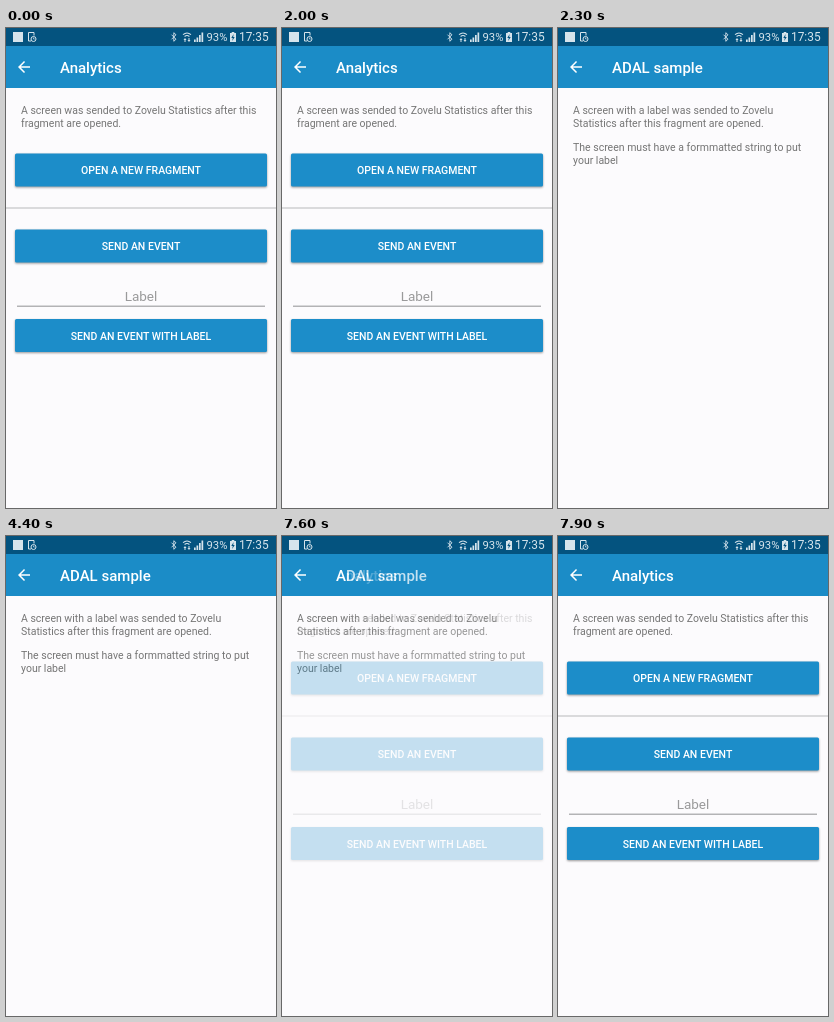
Recreate the animation shown at these times as an HTML page. Size 270x480 px, loop 8000 ms.

```html
<!DOCTYPE html>
<html lang="en">
<head>
<meta charset="utf-8">
<title>Analytics</title>
<style>
  html, body { margin: 0; width: 100%; height: 100%; overflow: hidden; background: #fcfbfd; }
  svg { display: block; width: 100vw; height: 100vh; font-family: Roboto, sans-serif; }
  .title { font-size: 15px; font-weight: 500; fill: #fff; }
  .body { font-size: 10.5px; fill: #757575; }
  .caption { font-size: 10.5px; font-weight: 500; fill: #fff; text-anchor: middle; }
  .hint { font-size: 13.5px; fill: #9a9a9b; text-anchor: middle; }
  .status { fill: #d6e4ec; }
</style>
</head>
<body>
<svg viewBox="0 0 270 480">
  <defs>
    <filter id="soft" x="-10%" y="-40%" width="120%" height="180%"><feGaussianBlur stdDeviation=".8"/></filter>
    <filter id="lift" x="-10%" y="-60%" width="120%" height="220%"><feGaussianBlur stdDeviation="2"/></filter>
    <clipPath id="face"><rect x="9" y="125.5" width="252" height="33" rx="1.5"/></clipPath>
  </defs>

  <g id="home"></g>
  <g id="detail"></g>

  <g class="status">
    <rect width="270" height="18" fill="#04537f"/>
    <rect x="7" y="4" width="10" height="10"/>
    <path d="M22.500 4.500h5.500v3M22.500 4.500v8.500h2.500" fill="none" stroke="#d6e4ec"/>
    <circle cx="27.500" cy="11" r="2.500" fill="none" stroke="#d6e4ec"/>
    <path d="M27.500 9.500v1.500h1.200" fill="none" stroke="#d6e4ec" stroke-width=".7"/>
    <path d="M165.500 6.700l4.500 4.500-2.200 2.100V4.700l2.200 2.100-4.500 4.500" fill="none" stroke="#d6e4ec" stroke-width=".9"/>
    <path d="M177 6.600q4-3.300 8 0M178.600 8.500q2.400-1.900 4.800 0" fill="none" stroke="#d6e4ec" stroke-width="1.100"/>
    <path d="M179 10l-1.500 2h1v2h1v-2h1zM183 14l1.500-2h-1v-2h-1v2h-1z"/>
    <path d="M188 11.500h1.700V14H188zM190.500 9.500h1.700V14h-1.700zM193 7h1.700v7H193zM195.500 4.500h1.700V14h-1.700z"/>
    <text x="200.500" y="13.300" font-size="11.300">93%</text>
    <path d="M225.700 4h2.600v1h1.700v9h-6V5h1.700z"/>
    <path d="M227.600 6l-2.300 4h1.500l-.6 3 2.500-4h-1.500z" fill="#04537f"/>
    <text x="233" y="13.300" font-size="11.900">17:35</text>
  </g>
</svg>
<script>
const LOOP = 8000, STEP = 100;
const $ = id => document.getElementById(id);

// Tracks are lists of [ms, value], linear in between.
const FADE = [[2000, 0], [2100, .38], [2200, .82], [2300, 1], [7400, 1],
              [7500, .96], [7600, .75], [7700, .3], [7800, .06], [7900, 0]];
const SCALE = [[2000, .975], [2100, .983], [2200, .997], [2300, 1]];
const RADIUS = [[800, 0], [1000, 29], [1300, 80], [1700, 150]];
const INK = [[800, 0], [900, .09], [1300, .09], [1800, 0]];
const LIFT = [[700, 0], [1000, 1], [1400, 1], [1900, 0]];

function at(track, t) {
  const i = track.findIndex(k => k[0] > t);
  if (i < 0) return track[track.length - 1][1];
  if (i === 0) return track[0][1];
  const [t0, a] = track[i - 1], [t1, b] = track[i];
  return a + (b - a) * (t - t0) / (t1 - t0);
}

const text = (cls, x, y, s) => `<text class="${cls}" x="${x}" y="${y}">${s}</text>`;
const lines = rows => rows.map(([y, s]) => text('body', 15, y, s)).join('');

const screen = (title, content) => `
  <rect y="18" width="270" height="462" fill="#fcfbfd"/>
  <rect y="18" width="270" height="42" fill="#1b8cc7"/>
  <path transform="translate(9 30) scale(.75)" fill="#fff"
    d="M20 11H7.830l5.590-5.590L12 4l-8 8 8 8 1.410-1.410L7.830 13H20z"/>
  ${text('title', 54, 45, title)}${content}`;

const plate = (y, extra) => `<rect x="9" y="${y}" width="252" height="33" rx="1.500" ${extra}/>`;
const button = (y, label, ink = '') =>
  plate(y + .9, 'fill="#000" opacity=".4" filter="url(#soft)"') +
  plate(y, 'fill="#1c8dc9"') + ink + text('caption', 135, y + 20.5, label);

$('home').innerHTML = screen('Analytics',
  lines([[86.3, 'A screen was sended to Zovelu Statistics after this'], [98.6, 'fragment are opened.']]) +
  plate(128, 'id="shade" opacity="0" filter="url(#lift)"') +
  button(125.5, 'OPEN A NEW FRAGMENT',
    '<g clip-path="url(#face)"><rect id="tint" x="9" y="125" width="252" height="34"/><circle id="ripple" cx="169" cy="143"/></g>') +
  '<rect y="179.500" width="270" height="1" fill="#b9b9bb"/>' +
  button(201.5, 'SEND AN EVENT') +
  text('hint', 135, 273, 'Label') +
  '<rect x="11" y="277.700" width="248" height=".9" fill="#858587"/>' +
  button(291, 'SEND AN EVENT WITH LABEL'));

$('detail').innerHTML = screen('ADAL sample', lines([
  [86.3, 'A screen with a label was sended to Zovelu'],
  [98.6, 'Statistics after this fragment are opened.'],
  [123.2, 'The screen must have a formmatted string to put'],
  [135.5, 'your label']]));

const home = $('home'), detail = $('detail'), shade = $('shade'), tint = $('tint'), ripple = $('ripple');

function draw(now) {
  const t = Math.floor((now % LOOP) / STEP) * STEP;
  const ink = at(INK, t), s = at(SCALE, t);
  ripple.setAttribute('r', at(RADIUS, t));
  ripple.setAttribute('opacity', ink);
  tint.setAttribute('opacity', ink * .4);
  shade.setAttribute('opacity', at(LIFT, t) * .35);
  detail.setAttribute('opacity', at(FADE, t));
  detail.setAttribute('transform', `translate(135 249) scale(${s}) translate(-135 -249)`);
}

const start = performance.now();
function tick() {
  draw(performance.now() - start);
  requestAnimationFrame(tick);
}
tick();
</script>
</body>
</html>
```
